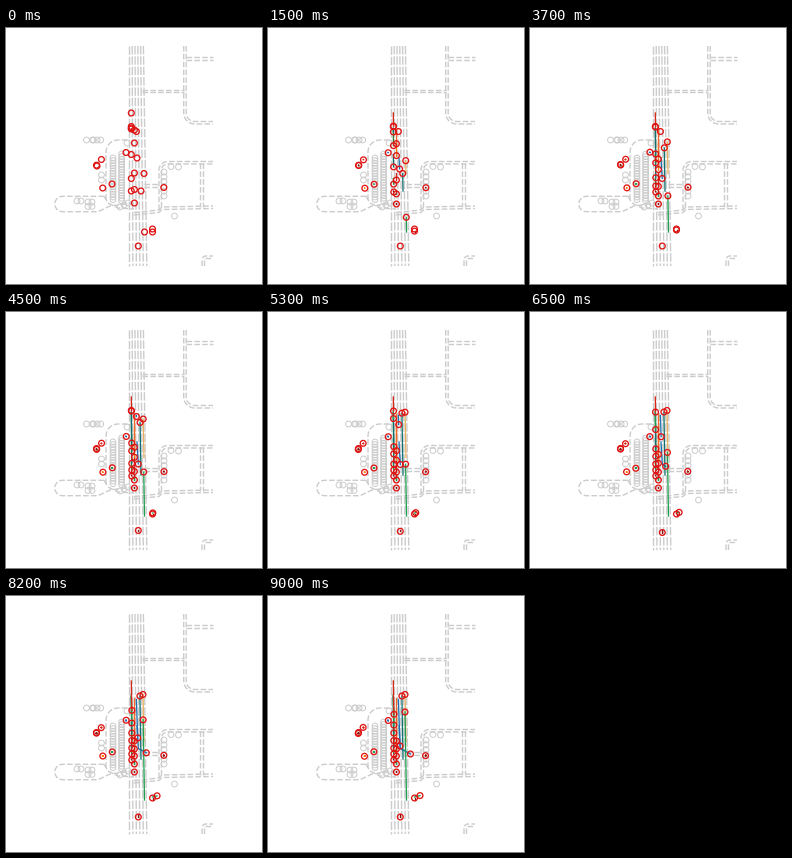
A matplotlib script for the animation above (9100 ms loop, 256 by 256 pixels).

```python
import numpy as np
import matplotlib.pyplot as plt
from matplotlib.animation import FuncAnimation
from matplotlib.collections import EllipseCollection

SIZE, DPI, FRAMES, STEP = 256, 100, 91, 100
PX = 72 / DPI
GRAY = "#cccccc"
RED, MAROON, CORAL, ORANGE, AMBER = "#d62718", "#8c1010", "#f4682a", "#ff7f0e", "#e8b060"
GREEN, MOSS, TEAL, BLUE = "#1f9e4f", "#2e7d32", "#11706f", "#1f6fae"
TIMES = np.arange(FRAMES) * STEP / 1000
rng = np.random.default_rng(4)


def drive(pos, *legs, brake=False):
    """Path made of legs (start, duration, x, y); braking cars ease to a stop."""
    pos = np.array(pos, float)
    path = np.tile(pos, (FRAMES, 1))
    for start, duration, *goal in legs:
        s = np.clip((TIMES - start) / duration, 0, 1)
        s = 1 - (1 - s) ** 2 if brake else s
        path += s[:, None] * (np.array(goal) - pos)
        pos = np.array(goal)
    return path


def queue(x0, x1, y0, y1, duration, start=0):
    return drive((x0, y0), (start, duration, x1, y1), brake=True)


def idle(x, y):
    """A waiting agent that only drifts a little."""
    a, b = TIMES * rng.uniform(1, 2, (2, 1))
    return np.column_stack([x + 0.3 * np.sin(a), y + 0.3 * np.sin(b)])


def left(*move):
    return queue(125.3, 125.8, *move)


def second(*move):
    return queue(128.4, 128.4, *move)


agents = [
    # southbound, left lane
    (left(163, 164, 1.5), MAROON),
    (left(150.5, 158, 3), MOSS),
    (left(126.5, 152, 5.3), TEAL),
    (left(101, 144.5, 7), MOSS),
    (left(100, 137, 5.5, 1.2), TEAL),
    (left(98.5, 129.5, 5, 4.6), GREEN),
    (drive((125.3, 85), (0, 2, 125.5, 99), (6.4, 4, 126, 121), brake=True), RED),
    # southbound, second lane
    (second(175, 176, 1.5), MAROON),
    (second(161.5, 168, 3.5), GREEN),
    (second(145, 160, 5.5), RED),
    (second(115, 153, 8.2), ORANGE),
    (second(102, 145, 8.6), CORAL),
    # southbound, turning lane
    (drive((130.4, 103.5), (4.4, 4.6, 132, 150)), BLUE),
    (queue(131, 132.3, 130, 152.5, 5.3)
     + drive((0, 0), (5.3, 3.7, 10.2, 5.5)), BLUE),
    # northbound
    (drive((138, 145.5), (0, 5.5, 137, 98.5)), AMBER),
    (drive((135, 163), (0, 5.4, 133.9, 100)), TEAL),
    (drive((138.5, 204), (0, 9, 137, 116)), GREEN),
    # slow movers
    (drive((146.5, 201), (4.2, 4.8, 152, 199.6)), GREEN),
    (drive((146.5, 204), (0, 3.5, 146.5, 202)), MAROON),
    (drive((91, 138), (0, 3, 90.5, 136.5)), MOSS),
    (drive((132.3, 218), (4, 3, 132.3, 221)), MAROON),
    # waiting
    (idle(90.5, 137.2), MAROON),
    (idle(95.4, 131.5), RED),
    (idle(120, 124.5), BLUE),
    (idle(106, 156), GREEN),
    (idle(96.7, 160), ORANGE),
    (idle(157.8, 159.5), MAROON),
]
paths = np.array([p for p, _ in agents])

fig = plt.figure(figsize=(SIZE / DPI, SIZE / DPI), dpi=DPI, facecolor="white")
ax = fig.add_axes([0, 0, 1, 1])
ax.set(xlim=(0, SIZE), ylim=(SIZE, 0))
ax.axis("off")


def road(*pts, dash=(4, 1.6)):
    x, y = zip(*pts)
    ax.plot(x, y, color=GRAY, lw=1.4 * PX, ls=(0, dash), zorder=1)


def lanes(x0, y0, x1, y1, dx=0.0, dy=0.0):
    """Two parallel edges, the second one moved by (dx, dy)."""
    for k in (0, 1):
        road((x0 + k * dx, y0 + k * dy), (x1 + k * dx, y1 + k * dy))


def bend(cx, cy, r, a0, a1):
    a = np.radians(np.linspace(a0, a1, 12))
    return list(zip(cx + r * np.cos(a), cy + r * np.sin(a)))


def rings(pts, color, z, lw):
    d = np.full(len(pts), 5.8)
    c = EllipseCollection(d, d, 0 * d, units="xy", offsets=pts,
                          offset_transform=ax.transData, facecolors="none",
                          edgecolors=color, linewidths=lw * PX, zorder=z)
    ax.add_collection(c)
    return c


# main road, fanning out to the south
for top, bottom in zip(np.linspace(123.4, 137.4, 6), np.linspace(123.4, 140.8, 6)):
    road((top, 18), (bottom, 238), dash=(6, 1.4))

# side streets
lanes(136, 61.5, 178, 61.5, dy=2.8)
lanes(180, 28.7, 207, 28.7, dy=2.8)
lanes(194, 135, 194, 179, dx=2.5)
lanes(138, 156, 152, 156, dy=2.5)
for k in (0, 1):
    d = 2.5 * k
    road((177.7 + d, 18), (177.7 + d, 85),
         *bend(188.7, 85, 11 - d, 180, 90), (207, 96 - d))
    road((153 + d, 182 - d), (153 + d, 142),
         *bend(161.5, 142, 8.5 - d, 180, 270), (207, 133.5 + d))
    road((128, 187 - d), (153, 184.5 - d), (156, 181.5 - d), (207, 180.5 - d))
    road((196 + d, 238), *bend(200, 232, 4 - d, 180, 270), (207, 228 + d))

# car park and loop
road((100, 172), (100, 125), *bend(112, 124, 12, 180, 270), (123, 112))
road((98, 168.3), *bend(56.5, 176, 7.7, 270, 90), (92, 183.7),
     (104, 178), (128, 175))
road((98, 168.3), (102, 175), (112, 180), (128, 181))

# rows of parked cars: x, y, step x, step y, count
ROWS = [(107, 130, 0, 2.6, 17), (115.6, 126, 0, 2.6, 19),
        (80.5, 112, 6, 0, 2), (87.5, 112, 3.6, 0, 3),
        (95.5, 147, 0, 5, 2), (71, 173, 4, 0, 2),
        (82, 174, 0, 4.5, 2), (86, 174, 0, 4.5, 2),
        (165, 138.5, 7.5, 0.5, 2), (158, 144, 0, 4.8, 6),
        (114, 179, 4, -2, 3), (121, 115, 0, 0, 1), (168.5, 188, 0, 0, 1)]
rings([(x + i * dx, y + i * dy) for x, y, dx, dy, n in ROWS for i in range(n)],
      GRAY, 1, 1)

trails = [ax.plot([], [], color=c, lw=1.3 * PX, zorder=3)[0] for _, c in agents]
heads = rings(paths[:, 0], "#e01212", 4, 1.3)


def draw(i):
    for line, p in zip(trails, paths):
        line.set_data(p[:i + 1, 0], p[:i + 1, 1])
    heads.set_offsets(paths[:, i])
    return [*trails, heads]


anim = FuncAnimation(fig, draw, frames=FRAMES, interval=STEP,
                     repeat=True, repeat_delay=0)
plt.show()
```
